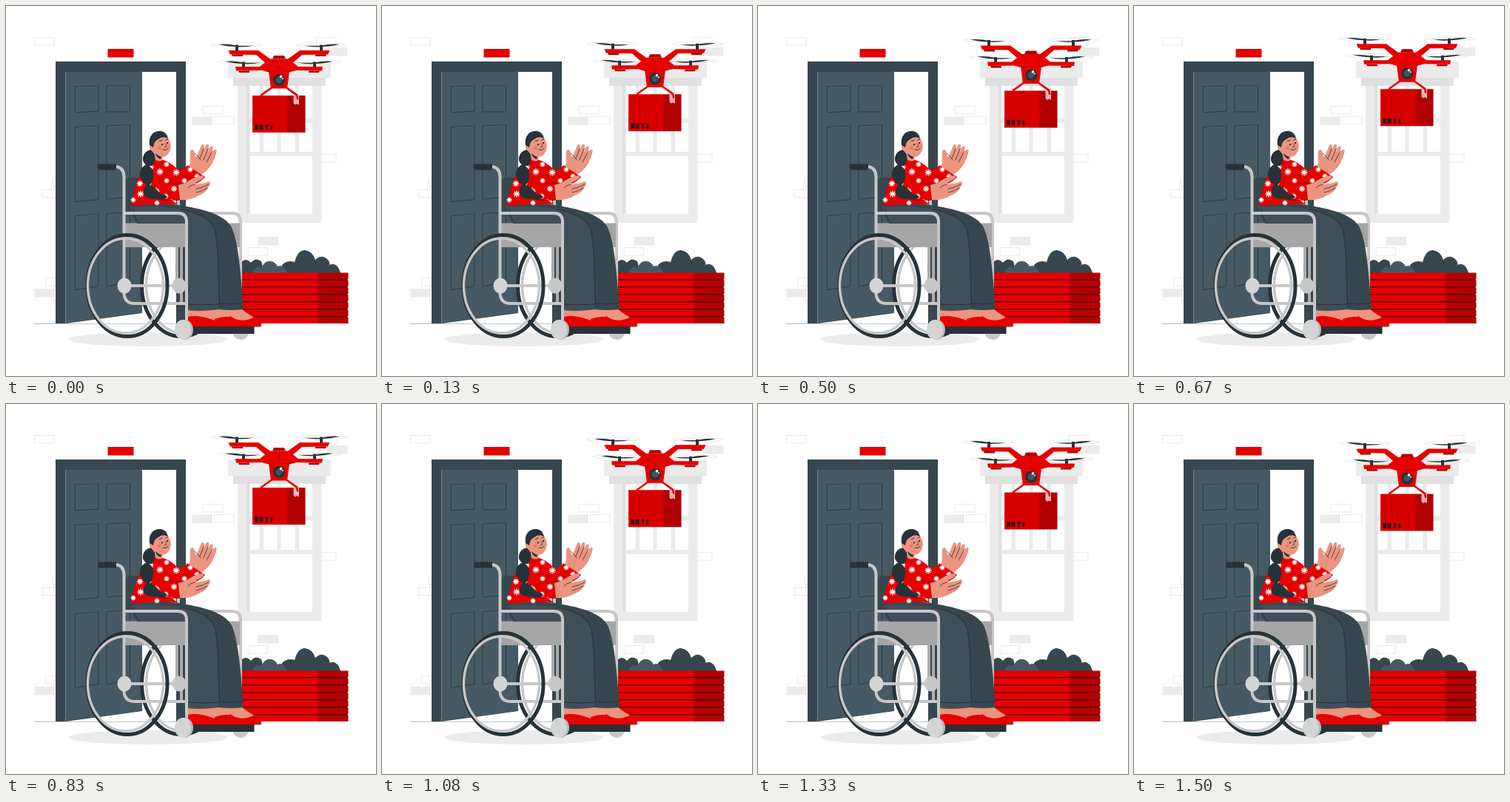
Animation, 500 px wide and 500 px high, one loop 1.54 s. Source, as an HTML page:

```html
<!DOCTYPE html>
<html lang="en">
<head>
<meta charset="utf-8">
<title>Drone delivery</title>
<style>
  html, body { margin: 0; width: 100%; height: 100%; overflow: hidden; background: #fff; }
  svg { display: block; width: 100%; height: 100%; }
  .line { fill: none; stroke-linecap: round; stroke-linejoin: round; }
  .tube { fill: none; stroke: #c7c7c7; stroke-width: 4; }
  .red { fill: #e60000; }
  .dark { fill: #263238; }
  .slate { fill: #37474f; }
  .skin { fill: #eb947f; }
</style>
</head>
<body>
<svg viewBox="0 0 500 500">
  <g id="bricks" stroke="#ebebeb"></g>

  <!-- window -->
  <g fill="#ebebeb">
    <path d="M300 75H439V97H300Z"/>
    <path fill-rule="evenodd" d="M313 108H426.500V293H313ZM329 108V281H414V108Z"/>
    <path d="M329 197H414V203H329ZM329 151.500H414V157.500H329ZM342.500 108H348V197H342.500ZM366.500 108H371.500V197H366.500ZM390.500 108H396V197H390.500Z"/>
    <path fill="#e0e0e0" d="M307 97H432V108H307ZM325 108H329.500V281H325Z"/>
  </g>

  <!-- planter -->
  <path class="slate" d="M319 361V345Q325 340 331 347Q337 339 345 345Q347 349 347 361ZM373 361V350Q380 343 390 346Q394 330 404 330Q414 331 418 343Q427 334 436 344Q439 350 438 361Z"/>
  <path class="slate" d="M436 361V351Q446 344 452 360V361Z"/>
  <path fill="#455a64" d="M333 361Q336 351 345 354Q350 343 359 345Q365 347 367 352Q375 348 379 361Z"/>
  <path fill="#5d0808" d="M319 361H461.500V428H319Z"/>
  <g id="slats"></g>

  <!-- door -->
  <path d="M38 429.300H245" stroke="#8b969b" stroke-width=".7"/>
  <path class="red" d="M137.500 58H172.500V69.500H137.500Z"/>
  <path class="slate" d="M67 75H243V429H67Z"/>
  <path fill="#fff" d="M184 89H230V429H81L184 415Z"/>
  <path fill="#455a64" d="M80.500 89H184V414.500L80.500 428.500Z"/>
  <path d="M80.500 89V429" stroke="#82939b" stroke-width=".8"/>
  <g id="panels" class="line" stroke="#2d3c44" stroke-width="1"></g>

  <!-- chair, far side -->
  <ellipse cx="192" cy="450.500" rx="108" ry="9.500" fill="#ebebeb"/>
  <ellipse cx="237" cy="378" rx="53.500" ry="68.500" fill="none" stroke="#263238" stroke-width="5"/>
  <ellipse cx="239" cy="378" rx="49.500" ry="64" fill="none" stroke="#c7c7c7" stroke-width="3.500"/>
  <ellipse cx="317" cy="440" rx="11" ry="11" fill="#c7c7c7"/>
  <path class="slate" d="M161 237Q162 232 168 232H184V281H161Z"/>
  <path class="tube" d="M233 250V280H306Q317 280 317 292V432"/>
  <path fill="#a6a6a6" d="M161 293.500H316V326H161Z"/>
  <path fill="none" stroke="#adadad" stroke-width="4" d="M237 326V402M231 326V378"/>
  <path class="dark" d="M242 433H335.500V443H242Z"/>

  <!-- feet -->
  <path class="skin" d="M286 407H317Q322 414 336 421L320 428L290 417ZM246 408H288Q295 417 306 420L297 428H246Z"/>
  <path class="red" d="M282 423Q296 418 306 421Q320 429 336 420Q346 420 345 433H282Z"/>
  <path class="red" d="M245 420Q261 417 279 424Q293 430 303 419Q311 423 308 433H245Z"/>
  <path class="line" d="M245 433H344" stroke="#b40000" stroke-width=".8"/>

  <!-- trousers -->
  <path class="slate" d="M170 267Q202 263 234 269C263 274 294 280 305 299C315 322 318 370 321 410Q304 412 287 410Q266 413 245 411V294H178Q167 286 170 267Z"/>
  <path fill="#3f5059" d="M204 271C249 274 276 285 283 305C288 340 288 380 287 410Q266 413 245 411V294H178Q166 282 170 272Z"/>
  <path class="line" stroke="#263238" d="M236 275C263 279 279 289 283 305C289 340 286 376 289 404M172 275Q172 287 180 293M246 403Q266 405 287 403M289 402Q304 404 320 402"/>

  <!-- far arm and hand -->
  <path class="skin" d="M247 217C251 211 248 201 249 196Q253 191 255 199Q256 205 258 203Q261 195 264 188Q268 185 268 192L267 196L270 188Q275 184 274 192L272 198L276 190Q281 187 279 195L276 202L281 195Q286 192 284 199C281 210 275 222 263 228Q253 227 247 217Z"/>
  <path class="line" stroke="#263238" stroke-width=".8" d="M267 193L262 206M273 193L267 208M279 196L271 211M255 199Q261 204 263 208"/>
  <path class="red" d="M245 215L269 231Q260 242 246 242L222 236L232 221Q240 223 245 215Z"/>

  <!-- torso -->
  <path class="skin" d="M199 193L212 200L211 213Q202 215 195 207Z"/>
  <path class="red" d="M188 216Q193 208 201 207Q207 212 212 208Q222 211 230 219L240 227L233 241L236 262Q228 263 222 261L232 268Q200 267 169 270C172 250 178 229 188 216Z"/>
  <path class="line" stroke="#8e0000" stroke-width=".8" d="M221 239Q229 241 235 240M205 261Q222 264 235 262M238 229Q246 232 250 236"/>
  <g id="flowers" class="line" stroke="#fff" stroke-width="1.300"></g>

  <!-- near hand -->
  <path class="skin" d="M233 242Q242 240 249 235Q258 229 266 229Q269 232 262 236Q256 238 255 241Q267 240 274 237Q278 238 274 244Q272 251 261 256Q249 263 235 262Z"/>
  <path class="line" stroke="#263238" stroke-width=".8" d="M255 241Q249 242 246 246M274 241Q265 246 257 247M272 246Q264 251 257 252"/>

  <!-- head -->
  <path class="dark" d="M196 194Q184 197 185 209Q188 217 197 216Q203 211 201 201Z"/>
  <path class="dark" d="M190 214Q180 218 181 229Q183 237 190 242Q183 249 187 256Q193 262 203 260Q213 264 218 258Q213 253 208 254Q202 244 194 242Q200 236 199 226Q199 218 190 214Z"/>
  <path class="skin" d="M198 184Q204 173 217 177Q223 182 223 190Q221 203 212 204Q203 202 200 197Q193 195 194 189Q195 186 198 189Z"/>
  <path class="dark" d="M194 188C192 175 200 168 209 169Q217 170 219 179Q211 175 206 180Q200 182 199 191ZM202 199Q206 203 210 204L209 207Q203 205 202 199Z"/>
  <g class="line" stroke="#263238">
    <path stroke-width="1" d="M207 183L211 181M216 181L219 180M212 194Q216 196 219 192"/>
    <path stroke-width=".7" d="M215 186L217 190L214 191"/>
    <path stroke-width="2.200" d="M211 187V187.500M218 185V185.500"/>
  </g>
  <circle cx="207" cy="192" r="2.500" fill="#e87867"/>

  <!-- chair, near side -->
  <path class="tube" d="M148 217Q159.500 218 159.500 231V388Q160 402 174 402H243M159 378H234M159 280H233Q244 280 244 292V432"/>
  <path class="dark" d="M124 213.500H149V221.500H124Z"/>
  <ellipse cx="234" cy="378" rx="9.500" ry="10.500" fill="#c7c7c7"/>
  <ellipse cx="164" cy="378" rx="54" ry="68.500" fill="none" stroke="#263238" stroke-width="5"/>
  <ellipse cx="161.500" cy="378" rx="51" ry="64" fill="none" stroke="#c7c7c7" stroke-width="3.500"/>
  <ellipse cx="160" cy="378" rx="9.500" ry="10.500" fill="#d4d4d4"/>
  <ellipse cx="241.500" cy="437.500" rx="11.500" ry="13.500" fill="#b8b8b8"/>
  <ellipse cx="239" cy="437.500" rx="11" ry="13.500" fill="#d4d4d4"/>

  <!-- drone -->
  <g id="drone">
    <g id="wing">
      <g fill="none" stroke="#e2e2e2" stroke-width=".7">
        <ellipse cx="312" cy="53.500" rx="35" ry="2.500"/>
        <ellipse cx="321" cy="76.500" rx="36" ry="2.500"/>
      </g>
      <path id="blade" class="dark" d="M287 52.500Q300 51.500 312 54Q325 55 336 53.500Q324 57 312 55.500Q301 55.500 287 52.500ZM310 53H314V61H310Z"/>
      <use href="#blade" x="9" y="23"/>
      <path class="red" d="M300.500 60.500H341L357 72H369V90H355L346 87.500L311 88L310 82.500H343L350 77L338 66.500L303 66Z"/>
      <path fill="#b40000" d="M305 66H320V68.500H306ZM314 88H329V90.500H315Z"/>
      <path class="line" stroke="#e60000" stroke-width="2.500" d="M359 111L345 121"/>
    </g>
    <use href="#wing" transform="matrix(-1 0 0 1 738 0)"/>
    <path fill="#b40000" d="M360 72L362 67.500H376L378 72Z"/>
    <path d="M369 73V89" stroke="#b40000" stroke-width=".7"/>
    <path class="red" d="M355 89H383L380 112H358Z"/>
    <path class="line" stroke="#b40000" stroke-width=".8" d="M355 89H383"/>
    <circle class="dark" cx="369" cy="100.500" r="8"/>
    <circle cx="369" cy="100.500" r="4.500" fill="#45545c"/>
    <circle cx="371.500" cy="96" r="1.800" fill="#fff"/>
    <circle cx="374" cy="98.500" r="1" fill="#fff"/>
    <path fill="#d60000" d="M333 121.500H381V171.500H333Z"/>
    <path fill="#b00000" d="M380.500 121.500H404.500V171.500H380.500Z"/>
    <path fill="#f3b5b5" d="M388.500 121.500H396V134L393 132.500L391 134L388.500 132Z"/>
    <path class="line" stroke="#e60000" stroke-width="2.500" d="M386 116L393 121L394 126"/>
    <path fill="#401014" d="M336 161H341V168H336ZM342.500 161H347.500V168H342.500ZM350 161H355L353.500 165V168H351.500V165ZM356 164.500L358.500 161L361 164.500H360V168H357V164.500Z"/>
  </g>
</svg>
<script>
  const byId = id => document.getElementById(id);
  const fill = (id, items, draw) => byId(id).innerHTML = items.map(draw).join("");

  const bricks = [[38.5, 42.5], [266.5, 135.5], [281.5, 149.5], [419.5, 42.5], [419.5, 200.5],
    [63.5, 234], [49, 248], [327, 326.5], [53.5, 367.5],
    [252, 150, 1], [434.5, 56.5, 1], [341, 312.5, 1], [39, 382.5, 1]];
  fill("bricks", bricks, ([x, y, solid]) =>
    `<rect x="${x}" y="${y}" width="26.5" height="10.500" fill="${solid ? "#ebebeb" : "#fff"}"/>`);

  fill("slats", [...Array(7).keys()], i => {
    const y = 360.5 + i * 10;
    return `<path class="red" d="M319 ${y}h103v8.500h-103z"/><path fill="#b40000" d="M421 ${y}h41.500v8.500h-41.500z"/>`;
  });

  const panels = [[94, 109, 35, 1], [136.5, 108, 35, 0], [94, 163.5, 101, 1.5],
    [136.5, 162, 99, 1.5], [94, 283.5, 100, 2.5], [136.5, 281, 98, 3]];
  fill("panels", panels, ([x, y, h, slant]) =>
    `<path d="M${x} ${y}l31 ${-slant}v${h - slant}l-31 ${slant * 2}z"/>
     <path stroke-width=".6" stroke="#53676f" d="M${x + 1.5} ${y + h - 1}v${2 - h}l28 ${-slant}"/>`);

  const flowers = [[208, 224, 4], [217, 214, 3], [230, 225, 4], [203, 250, 4], [193, 240, 3],
    [181, 240, 3.5], [182, 254, 4], [172, 262, 3], [204, 266, 3], [217, 236, 3], [227, 247, 3.5],
    [216, 257, 3], [196, 218, 3], [241, 236, 3], [258, 230, 3], [249, 221, 3]];
  fill("flowers", flowers, ([x, y, r]) => {
    const petals = [0, 1, 2, 3].map(i => {
      const dx = r * Math.cos(i * Math.PI / 4), dy = r * Math.sin(i * Math.PI / 4);
      return `M${x - dx} ${y - dy}L${x + dx} ${y + dy}`;
    });
    return `<path d="${petals.join("")}"/>`;
  });

  // The drone rises and sinks 10 px at constant speed.
  const LOOP = 1540, LEAD = 47, RISE = 10;
  const drone = byId("drone"), start = performance.now();
  function frame() {
    const phase = (performance.now() - start + LEAD) % LOOP / (LOOP / 2);
    drone.setAttribute("transform", `translate(0 ${-RISE * (1 - Math.abs(1 - phase))})`);
    requestAnimationFrame(frame);
  }
  frame();
</script>
</body>
</html>
```
